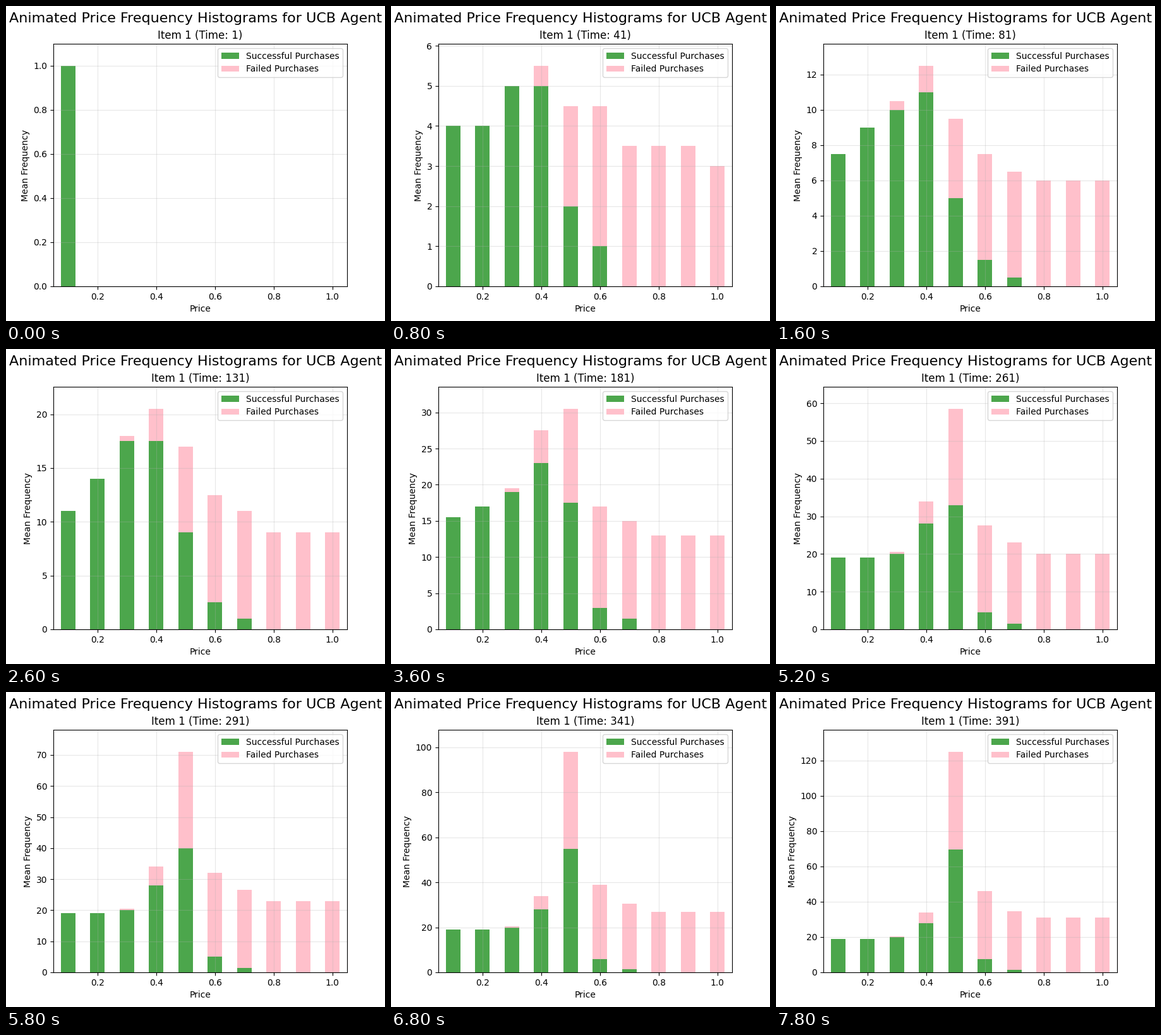
Animation, 600 px wide and 500 px high, one loop 8 s. Source, as a matplotlib script:

```python
import numpy as np
import matplotlib.pyplot as plt
from matplotlib.animation import FuncAnimation

FRAMES, INTERVAL, STEP = 40, 200, 10
PRICES = np.arange(1, 11) / 10

# Mean number of offers per price at a few points in time
TIMES = [1, 11, 41, 81, 131, 221, 291, 391]
OFFERS = np.array([
    [1, 0, 0, 0, 0, 0, 0, 0, 0, 0],
    [1, 1, 1, 2, 1, 1, 1, 1, 1, 1],
    [4, 4, 5, 5.5, 4.5, 4.5, 3.5, 3.5, 3.5, 3],
    [7.5, 9, 10.5, 12.5, 9.5, 7.5, 6.5, 6, 6, 6],
    [11, 14, 18, 20.5, 17, 12.5, 11, 9, 9, 9],
    [19, 19, 20.5, 33.5, 41.5, 21, 18.5, 16, 16, 16],
    [19, 19, 20.5, 34, 71, 32, 26.5, 23, 23, 23],
    [19, 19, 20.5, 34, 125, 46, 34.5, 31, 31, 31],
])

# The two lowest prices always sell, the three highest never do
SALES = np.zeros_like(OFFERS)
SALES[:, :2] = OFFERS[:, :2]
SALES[:, 2:7] = [
    [0, 0, 0, 0, 0],
    [1, 2, 0, 0, 0],
    [5, 5, 2, 1, 0],
    [10, 11, 5, 1.5, 0.5],
    [17.5, 17.5, 9, 2.5, 1],
    [20, 27.5, 24, 3.5, 1.5],
    [20, 28, 40, 5, 1.5],
    [20, 28, 69.5, 7.5, 1.5],
]


def counts_at(t, table):
    """Interpolated counts; a mean of two runs moves in halves."""
    return np.array([np.round(2 * np.interp(t, TIMES, col)) / 2
                     for col in table.T])


fig, ax = plt.subplots(figsize=(6, 5), dpi=100)
fig.suptitle("Animated Price Frequency Histograms for UCB Agent", fontsize=16)


def draw(i):
    t = 1 + STEP * i
    offers = counts_at(t, OFFERS)
    sales = np.minimum(counts_at(t, SALES), offers)

    ax.clear()
    ax.bar(PRICES, sales, width=0.05, color="green", alpha=0.7,
           label="Successful Purchases")
    ax.bar(PRICES, offers - sales, width=0.05, bottom=sales, color="pink",
           label="Failed Purchases")
    ax.set_xlim(0.05, 1.05)
    ax.set_ylim(0, offers.max() * 1.1)
    ax.set_title(f"Item 1 (Time: {t})")
    ax.set_xlabel("Price")
    ax.set_ylabel("Mean Frequency")
    ax.grid(True, alpha=0.3)
    ax.legend(loc="upper right")


anim = FuncAnimation(fig, draw, frames=FRAMES, interval=INTERVAL,
                     init_func=lambda: draw(0), repeat=True, repeat_delay=0)
plt.show()
```
